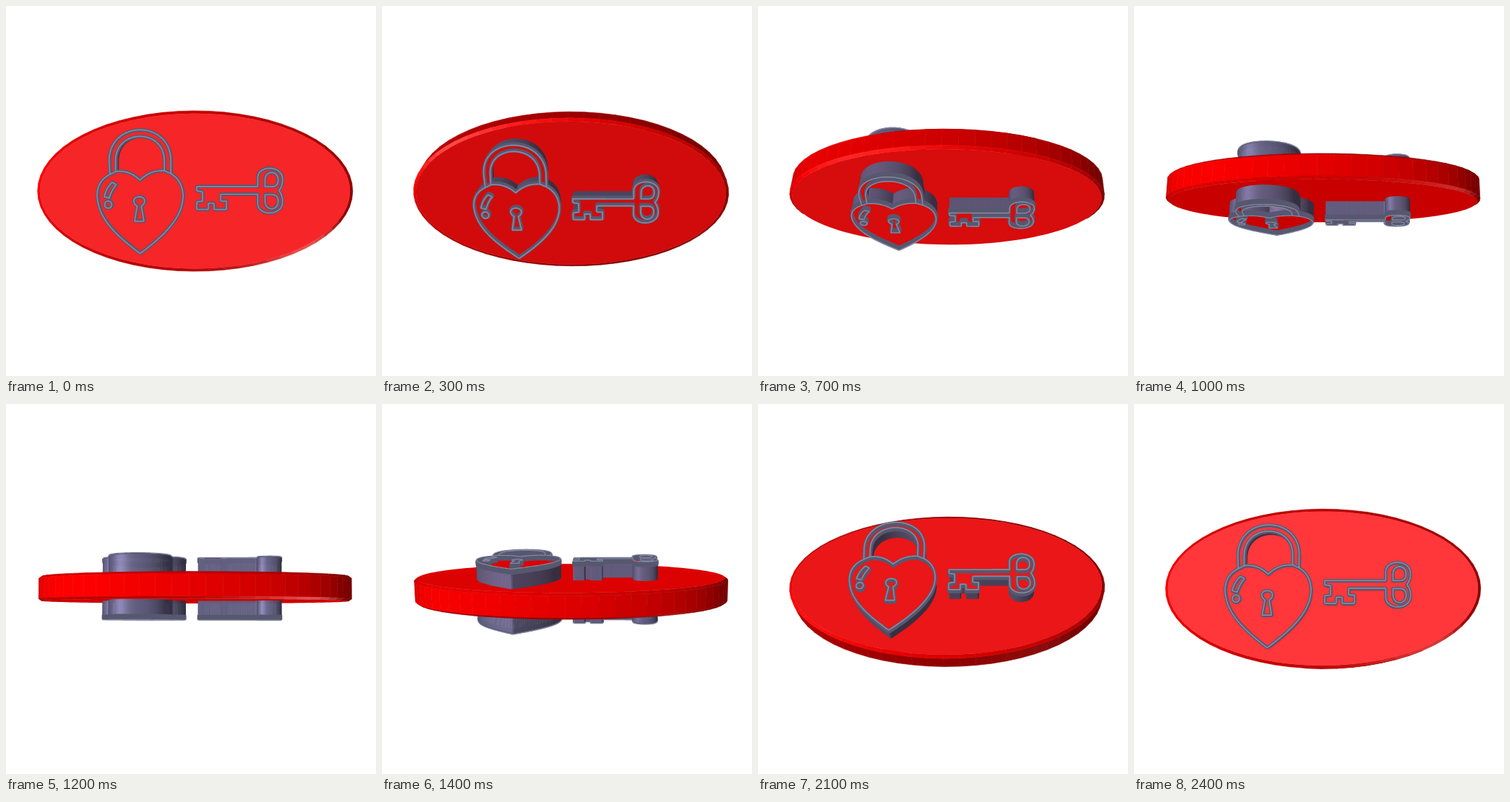
Recreate the animation shown at these times as an HTML page with a canvas. Size 512x512 px, loop 2.5 s.

```html
<!DOCTYPE html>
<html lang="en">
<head>
<meta charset="utf-8">
<title>Turning plaque</title>
<style>
  html, body { margin: 0; width: 100%; height: 100%; overflow: hidden; background: #fff; }
  canvas { display: block; width: 512px; height: 512px; }
</style>
</head>
<body>
<canvas id="stage" width="512" height="512"></canvas>
<script>
const ctx = document.getElementById('stage').getContext('2d');
const CX = 260, CY = 256, CAMERA = 1050, YAW = 0.055;
const RX = 215.5, RY = 109.6, BEVEL = 4;
const FLOOR = 17, INLAY = 37, TOP = 41, LINE = 43;
const FRAMES = 25, FRAME_MS = 100, START = 0.9;
const LIGHT = [-0.55, 0.1, 0.9], GLINT = [0.3, -0.65, 0.7], GLOSS = [-0.33, 0.13, 0.935];

const dot = (a, b) => a[0] * b[0] + a[1] * b[1] + a[2] * b[2];
const rgb = c => `rgb(${c.map(v => Math.max(0, Math.min(255, Math.round(v)))).join()})`;

// Tilt about the horizontal axis, add a slight yaw, then project.
function turn([x, y, z], a) {
  const c = Math.cos(a), s = Math.sin(a), depth = y * s + z * c;
  return [x * Math.cos(YAW) - depth * Math.sin(YAW), y * c - z * s,
    depth * Math.cos(YAW) + x * Math.sin(YAW)];
}
function project(p, a) {
  const [x, y, z] = turn(p, a), k = CAMERA / (CAMERA - z);
  return [CX + x * k, CY - y * k];
}

// Paths are written as seen from the front and sampled into relief coordinates.
function outline(d, hole = false) {
  const path = document.createElementNS('http://www.w3.org/2000/svg', 'path');
  path.setAttribute('d', d);
  const length = path.getTotalLength(), n = Math.ceil(length / 1.8), k = 1.042;
  const points = [];
  for (let i = 0; i < n; i++) {
    const p = path.getPointAtLength(length * i / n);
    points.push([(p.x - CX) / k + LINE * YAW, (CY - p.y) / k + 0.7]);
  }
  let area = 0;
  points.forEach(([x, y], i) => {
    const [u, v] = points[(i + 1) % n];
    area += x * v - u * y;
  });
  if ((area > 0) === hole) points.reverse();
  return points;
}
const circle = (x, y, r) =>
  `M${x - r},${y} a${r},${r} 0 1 1 ${2 * r},0 a${r},${r} 0 1 1 ${-2 * r},0Z`;

const lock = outline(`M143,233 C131,239 125,249 125,262 C126,295 152,318 185,343
  C220,317 245,292 245,262 C244,247 238,238 228,232 L228,214
  C228,157 142,157 142,214Z`);
const lockHole = outline(`M151,229 L151,214 C151,169 219,169 219,214 L219,228
  C204,227 193,233 185,241 C177,233 166,227 151,229Z`, true);
const key = outline(`M264,250 L348,250 L348,238 C348,220 382,220 382,240
  C382,247 380,252 377,255.5 C380,259 382,264 382,271 C382,291 348,291 348,273
  L348,260.5 L297,260.5 L297,270 L305,270 L305,281.5 L288,281.5 L288,273
  L280,273 L280,281.5 L264,281.5 L264,271 L272,270 L272,257 L264,256Z`);
const details = [
  'M181,277 C174,273 175,264 184,264 C193,264 194,273 187,277 L190.5,298 L177.5,298Z',
  'M146,244 L152,247 C147,253 144,259 142,266 L135,264 C137,256 140,250 146,244Z',
  circle(140.5, 275, 5),
  'M358,250 L358,241 C358,227 376,227 376,241 C376,247 373,250 368,250Z',
  'M358,261 L358,270 C358,284 376,284 376,270 C376,264 373,261 368,261Z',
  'M143,233 L151,229 L143,233Z',
  'M228,232 L219,228 L228,232Z'
].map(d => outline(d));

function trace(points, z, a) {
  points.forEach((p, i) => {
    const q = project([p[0], p[1], z], a);
    i ? ctx.lineTo(...q) : ctx.moveTo(...q);
  });
  ctx.closePath();
}

function facet(points, a, color) {
  ctx.beginPath();
  points.forEach(p => ctx.lineTo(...project(p, a)));
  ctx.closePath();
  ctx.fillStyle = ctx.strokeStyle = color;
  ctx.lineWidth = 0.6;
  ctx.fill();
  ctx.stroke();
}

const facesCamera = (normal, point) =>
  dot(normal, [-point[0], -point[1], CAMERA - point[2]]) > 0;

// Side is 1 for the front relief and -1 for its mirror image on the back.
function walls(points, a, side) {
  const quads = [], top = side * TOP, floor = side * FLOOR;
  points.forEach((p, i) => {
    const q = points[(i + 1) % points.length];
    const dx = q[0] - p[0], dy = q[1] - p[1], len = Math.hypot(dx, dy) || 1;
    const normal = turn([dy / len, -dx / len, 0], a);
    const at = turn([...p, top], a);
    if (facesCamera(normal, at)) quads.push({ p, q, normal, depth: at[2] });
  });
  quads.sort((m, n) => m.depth - n.depth);
  for (const { p, q, normal } of quads) {
    const lit = Math.max(0, dot(normal, LIGHT));
    const v = 52 + 50 * lit + 40 * (lit / 1.06) ** 30;
    facet([[...p, top], [...q, top], [...q, floor], [...p, floor]], a,
      rgb([v, v * 0.96, v * 1.3]));
  }
}

// Raised metal lines, stacked from the inlay up to a bright crest.
function ridges(shapes, a, side) {
  const width = 2.5 + 1.8 * Math.cos(a);
  ctx.lineJoin = 'round';
  const layer = (color, w, z) => {
    ctx.beginPath();
    shapes.forEach(s => trace(s, side * z, a));
    ctx.strokeStyle = color;
    ctx.lineWidth = w;
    ctx.stroke();
  };
  for (let z = INLAY; z < LINE; z += 1.5) layer('#57586f', width, z);
  layer('#8589a3', width * 0.4, LINE);
}

function ellipsePoint(angle, inset, z) {
  return [(RX - inset) * Math.cos(angle), (RY - inset) * Math.sin(angle), z];
}

// One band of the edge; slope tips its normals towards a face.
function band(a, [z0, inset0], [z1, inset1], slope) {
  const count = 64, step = 2 * Math.PI / count;
  for (let i = 0; i < count; i++) {
    const t0 = i * step, t1 = t0 + step, mid = t0 + step / 2;
    const nx = Math.cos(mid) / RX, ny = Math.sin(mid) / RY, len = Math.hypot(nx, ny);
    const k = Math.hypot(1, slope);
    const normal = turn([nx / len / k, ny / len / k, slope / k], a);
    if (!facesCamera(normal, turn(ellipsePoint(mid, inset0, z0), a))) continue;
    const v = 118 + 125 * Math.max(0, dot(normal, LIGHT)) ** 1.5;
    const shine = 75 * Math.max(0, dot(normal, GLINT)) ** 40
      + 150 * Math.abs(slope) * Math.max(0, dot(normal, GLOSS)) ** 40;
    facet([ellipsePoint(t0, inset0, z0), ellipsePoint(t1, inset0, z0),
      ellipsePoint(t1, inset1, z1), ellipsePoint(t0, inset1, z1)], a,
      rgb([v + shine, shine, shine]));
  }
}

// Face colour by tilt in degrees: red, then the shared green and blue.
const tones = [[-90, 222, 0], [-50, 216, 6], [-25, 236, 24], [-10, 255, 58],
  [-6, 255, 54], [1, 245, 37], [23, 208, 10], [51, 214, 12], [73, 200, 0], [90, 205, 0]];
function faceColor(deg) {
  const i = Math.max(1, tones.findIndex(t => t[0] >= deg));
  const [d0, r0, g0] = tones[i - 1], [d1, r1, g1] = tones[i];
  const u = (deg - d0) / (d1 - d0), g = g0 + (g1 - g0) * u;
  return rgb([r0 + (r1 - r0) * u, g, g * 1.07]);
}

function draw(time) {
  const step = Math.floor(time / FRAME_MS) % FRAMES;
  // Both sides mirror each other, so the tilt wraps when seen edge-on.
  const deg = (START + step * 180 / FRAMES + 90) % 180 - 90;
  const a = deg * Math.PI / 180, red = faceColor(deg);

  ctx.fillStyle = '#fff';
  ctx.fillRect(0, 0, 512, 512);

  ridges([lock, key], a, -1);
  walls(lock, a, -1);
  walls(key, a, -1);

  band(a, [-FLOOR, BEVEL], [-14, 0], -1);
  band(a, [-14, 0], [14, 0], 0);
  band(a, [14, 0], [FLOOR, BEVEL], 1);
  ctx.beginPath();
  for (let i = 0; i < 120; i++) {
    ctx.lineTo(...project(ellipsePoint(i * Math.PI / 60, BEVEL, FLOOR), a));
  }
  ctx.fillStyle = red;
  ctx.fill();

  walls(lockHole, a, 1);
  walls(lock, a, 1);
  walls(key, a, 1);
  ctx.beginPath();
  [lock, lockHole, key].forEach(s => trace(s, INLAY, a));
  ctx.fillStyle = red;
  ctx.fill('evenodd');
  ridges([lock, lockHole, key, ...details], a, 1);
}

const begin = performance.now();
function tick() {
  draw(performance.now() - begin);
  requestAnimationFrame(tick);
}
tick();
</script>
</body>
</html>
```
